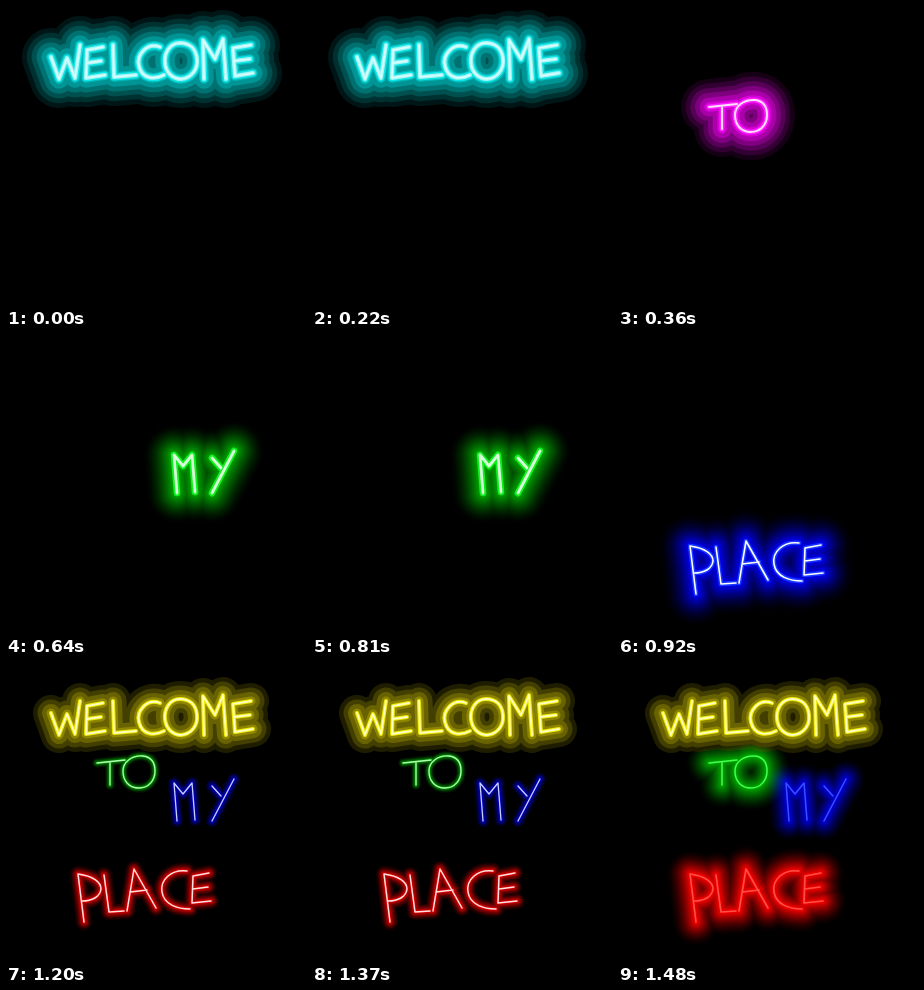
Animation of 300 by 300 pixels, one loop 1760 ms. Source, as an HTML page with a canvas:

```html
<!DOCTYPE html>
<html lang="en">
<head>
<meta charset="utf-8">
<title>Neon sign</title>
<style>
  html, body { margin: 0; width: 100%; height: 100%; overflow: hidden; background: #000; }
  canvas { display: block; }
</style>
</head>
<body>
<canvas id="sign" width="300" height="300" role="img" aria-label="Welcome to my place"></canvas>
<script>
const ctx = document.getElementById('sign').getContext('2d');

// Hand-drawn lettering, one path per word
const welcome = new Path2D(`
  M45 51 L53 73 L61 52 L69 72 L74 39
  M97 41 L81 44 L80 72 L99 69 M81 57 L95 55
  M107 39 L108 71 L130 69
  M154 41 C141 36 130 49 133 60 C136 73 148 74 158 69
  M174 37 C163 37 158 48 159 57 C160 67 167 73 175 73 C186 72 192 63 191 53 C190 43 184 37 174 37
  M198 73 L197 34 L209 53 L217 33 L220 73
  M245 39 L227 42 L229 70 L247 67 M228 55 L244 53`);
const to = new Path2D(`
  M91 101 L119 98 M104 100 L104 123
  M137 94 C126 93 117 100 117 109 C117 119 123 126 133 126 C143 126 149 118 149 109 C149 100 145 95 137 94`);
const my = new Path2D(`
  M171 159 L168 121 L177 132 L186 121 L189 158
  M206 124 L215 134 M228 117 L206 159`);
const place = new Path2D(`
  M78 260 L72 212 C87 214 95 220 95 227 C94 235 86 239 76 239
  M98 213 L103 250 L118 249
  M121 249 L128 207 L150 246 M124 230 L141 228
  M181 209 C165 207 154 218 156 230 C158 243 172 247 184 247
  M203 211 L187 214 L186 241 L205 239 M187 227 L202 225`);

const cyan = [0, 1, 1], magenta = [1, 0, 1], green = [0, 1, 0],
      blue = [0, 0, 1], red = [1, 0, 0], yellow = [1, 0.94, 0];

function line(word, width, color) {
  ctx.lineWidth = width;
  ctx.strokeStyle = color;
  ctx.stroke(word);
}

// Nested strokes brighten inwards: few steps give bands, many a soft fade
function halo(word, hue, radius, steps, peak, power) {
  for (let i = 0; i < steps; i++) {
    const level = 255 * peak * ((i + 1) / steps) ** power;
    line(word, 2 * radius * (1 - i / steps), `rgb(${hue.map(c => Math.round(c * level))})`);
  }
}

function yellowWelcome() {
  halo(welcome, yellow, 18, 4, 0.56, 1.1);
  line(welcome, 4, '#f0e800');
  line(welcome, 1.8, '#ffffc0');
}

const scenes = [
  [360, () => {
    halo(welcome, cyan, 29, 6, 0.72, 1.2);
    line(welcome, 7, '#10e4e4');
    line(welcome, 4, '#a8f4f4');
    line(welcome, 1.5, '#d8ffff');
  }],
  [280, () => {
    halo(to, magenta, 28, 6, 0.84, 1.3);
    line(to, 5, '#ff20ff');
    line(to, 2, '#ffe0ff');
  }],
  [280, () => {
    halo(my, green, 30, 24, 0.72, 1.6);
    line(my, 6.5, '#10f020');
    line(my, 2.8, '#d8ffd8');
  }],
  [280, () => {
    halo(place, blue, 33, 28, 1, 1.9);
    line(place, 4.5, '#1838ff');
    line(place, 1.6, '#ffffff');
  }],
  [280, () => {
    yellowWelcome();
    halo(to, green, 5, 6, 0.6, 1.5);
    line(to, 1.3, '#b0ffb0');
    halo(my, blue, 7, 8, 0.8, 1.5);
    line(my, 1.3, '#c8d0ff');
    halo(place, red, 9, 10, 0.9, 1.6);
    line(place, 1.5, '#ffe0e0');
  }],
  [280, () => {
    yellowWelcome();
    halo(to, green, 23, 20, 0.65, 1.6);
    line(to, 1.5, '#40ff50');
    halo(my, blue, 20, 20, 0.85, 1.6);
    line(my, 1.5, '#3850ff');
    halo(place, red, 24, 24, 0.98, 1.7);
    line(place, 1.6, '#ff5048');
  }]
];
const loop = scenes.reduce((sum, [ms]) => sum + ms, 0);

ctx.lineCap = ctx.lineJoin = 'round';
const start = performance.now();
let shown = -1;

function tick() {
  let t = (performance.now() - start) % loop, i = 0;
  while (t >= scenes[i][0]) t -= scenes[i++][0];
  if (i !== shown) {
    shown = i;
    ctx.globalCompositeOperation = 'source-over';
    ctx.fillStyle = '#000';
    ctx.fillRect(0, 0, 300, 300);
    ctx.globalCompositeOperation = 'lighten';
    scenes[i][1]();
  }
  requestAnimationFrame(tick);
}
tick();
</script>
</body>
</html>
```
